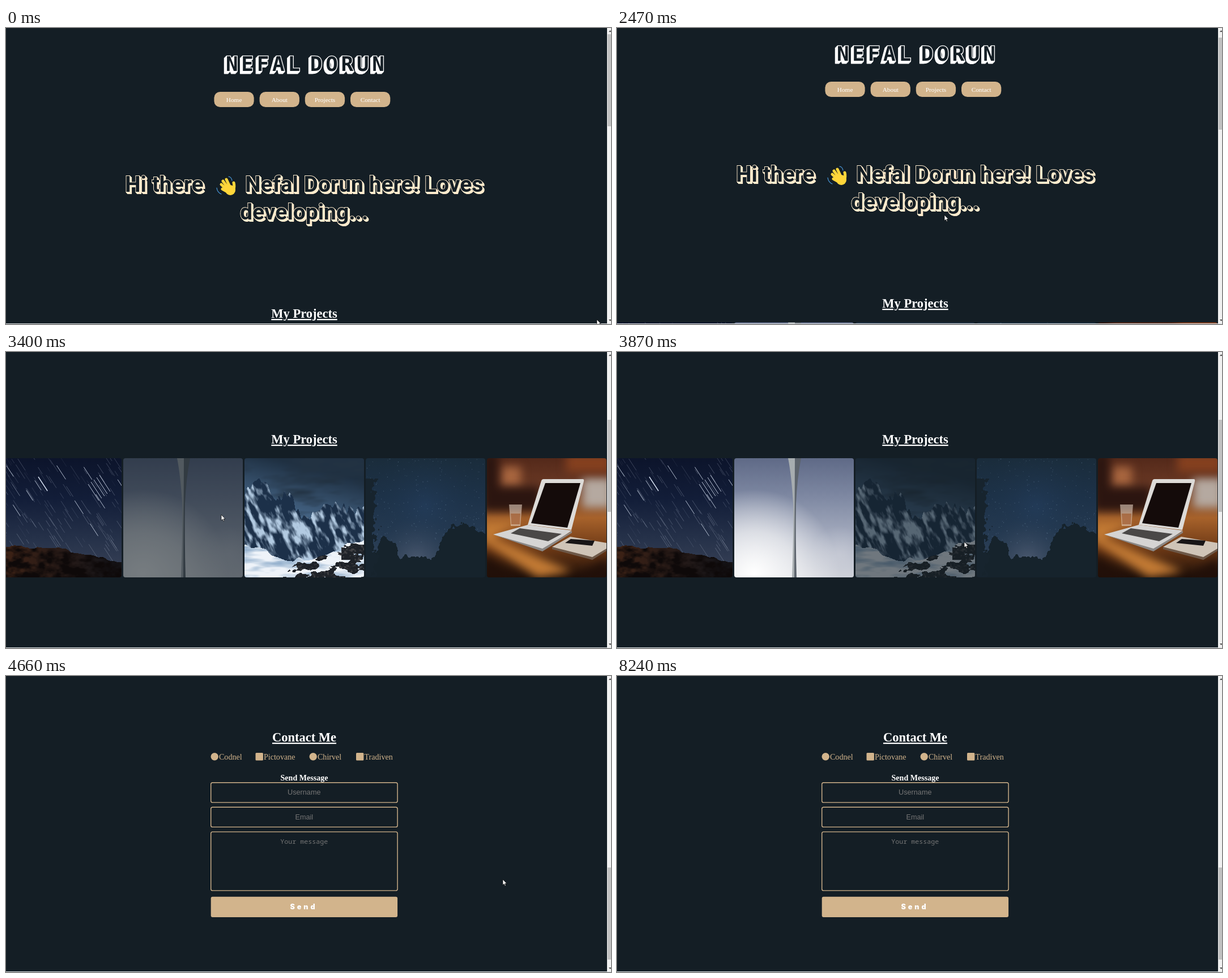
Recreate the animation shown at these times as an HTML page with a canvas. Size 1068 px wide and 524 px high, loop 8.58 s.

```html
<!DOCTYPE html>
<html lang="en">
<head>
<meta charset="utf-8">
<title>Portfolio</title>
<style>
  html, body { margin: 0; width: 100%; height: 100%; overflow: hidden; background: #141e25; }
  #stage { position: relative; width: 1068px; height: 524px; overflow: hidden; }
  #page, #page > *, #chrome { position: absolute; left: 0; top: 0; }
  #page { will-change: transform; }
  svg { display: block; }
  text { font-family: "Liberation Serif", "Times New Roman", serif; fill: #fff; }
  .mid { text-anchor: middle; }
  .head { font-size: 22.5px; font-weight: 700; text-decoration: underline; }
  .sub { font-size: 14.06px; font-weight: 700; }
  .nav rect, .send rect { fill: tan; }
  .nav text { font-size: 11.3px; }
  .nav.on rect { fill: orangered; }
  .link, .link text { fill: tan; font-size: 14.06px; }
  .link.on, .link.on text { fill: orangered; }
  .field rect { fill: none; stroke: tan; stroke-width: 1.4; }
  .field text { fill: #757575; font: 12.66px "Liberation Sans", Arial, sans-serif; }
  .field .mono { font: 11.66px "Noto Sans Mono", monospace; }
  .send text { font: 900 12.6px Inter, sans-serif; letter-spacing: 3.9px; }
  .send.on text { fill: orangered; }
  #name { font: 700 36px "DejaVu Sans Mono", monospace; letter-spacing: 5.7px; word-spacing: -15.4px; }
  #hero text { font: 700 39px Roboto, sans-serif; }
  #name, #hero text { fill: inherit; }
  canvas { border-radius: 4px; }
  canvas.on { opacity: .42; }
</style>
</head>
<body>
<div id="stage">
  <div id="page">
    <svg id="art" width="1061" height="1611">
      <defs>
        <text id="name" x="388" y="76">NEFAL DORUN</text>
        <g id="hero">
          <text x="210" y="290">Hi there</text>
          <text x="422" y="290">Nefal Dorun here! Loves</text>
          <text x="413" y="339">developing...</text>
        </g>
      </defs>
      <g id="shades"></g>
      <g fill="none" stroke-linecap="round">
        <circle cx="396" cy="287" r="9" fill="#ffd63a"/>
        <path stroke="#ffd63a" stroke-width="5" d="M397 285L389 268M394 286L383 271M392 288L380 277M391 290L382 285M401 289Q404 281 402 274"/>
        <path stroke="#4a9be0" stroke-width="1.2" d="M393 263q5 1 6 7M372 283q1 8 8 11"/>
      </g>
      <text class="head mid" x="526.5" y="513">My Projects</text>
      <g id="contact" transform="translate(0 1055)">
        <text class="head mid" x="526.5" y="116">Contact Me</text>
        <text class="sub mid" x="526.5" y="184.5">Send Message</text>
      </g>
    </svg>
  </div>
  <svg id="chrome" width="1068" height="524">
    <rect y="523" width="1068" height="1" fill="#dfe3e6"/>
    <rect x="1061" width="7" height="523" fill="#f1f1f1"/>
    <rect id="thumb" x="1062" width="6" height="163" fill="#c1c1c1"/>
    <path d="M1064 7l2.5-3 2.5 3zM1064 516l2.5 3 2.5-3z" fill="#505050"/>
    <path id="cursor" fill="#fff" stroke="#000" stroke-width=".7" stroke-linejoin="round"/>
  </svg>
</div>
<script>
const $ = id => document.getElementById(id);
const LOOP = 8580, GONE = 8200;          // loop length, time the pointer leaves
const GALLERY = 351, CONTACT = 1055;     // scroll stops
const hot = [];                          // hover areas in page coordinates

const clamp = v => Math.max(0, Math.min(1, v));
const smooth = v => (v = clamp(v), v * v * (3 - 2 * v));
const lerp = (a, b, t) => a + (b - a) * t;

// Eased value of a list of [position, ...values]
function along(keys, p) {
  const n = keys.findIndex(k => k[0] > p);
  const b = keys.at(n), a = n > 0 ? keys[n - 1] : b;
  const e = smooth((p - a[0]) / (b[0] - a[0] || 1));
  return a.slice(1).map((v, i) => lerp(v, b[i + 1], e));
}

function add(parent, html) {
  parent.insertAdjacentHTML('beforeend', html);
  return parent.lastElementChild;
}
const area = (el, x, y, w, h, kind) => hot.push({ el, x, y, w, h, kind });

// Lettering with a solid extruded side
function shade(id, color, dir, depth, line) {
  for (let i = depth; i >= 0; i -= .5)
    add($('shades'), `<use href="#${id}" x="${dir * i}" y="${i}" fill="${color}" stroke="${color}" stroke-width="${line}"/>`);
  add($('shades'), `<use href="#${id}" fill="#141e25"/>`);
}
shade('name', '#fff', -1, 4, 2.6);
shade('hero', '#ffebcd', 1, 3, 1.8);

['Home', 'About', 'Projects', 'Contact'].forEach((label, i) => {
  const x = 367.4 + i * 80.2;
  area(add($('art'), `<g class="nav"><rect x="${x}" y="113" width="70.3" height="27" rx="10.5"/>
    <text class="mid" x="${x + 35.2}" y="131">${label}</text></g>`), x, 113, 70, 27, 'hand');
});

const contact = $('contact');
[['Codnel', 361], ['Pictovane', 440], ['Chirvel', 535], ['Tradiven', 617.5]].forEach(([label, x], i) => {
  const el = add(contact, `<g class="link"><rect x="${x + .5}" y="136" width="13.4" height="13.4" rx="${i % 2 ? 1.5 : 7}"/>
    <text x="${x + 15}" y="147.5">${label}</text></g>`);
  area(el, x, CONTACT + 135, 72, 16, 'hand');
});

function box(kind, y, h, content, pointer) {
  const el = add(contact, `<g class="${kind}"><rect x="361.7" y="${y}" width="329.4" height="${h}" rx="3"/>${content}</g>`);
  area(el, 361, CONTACT + y, 330, h, pointer);
}
const hint = (y, label, cls = '') => `<text class="mid ${cls}" x="526.3" y="${y}">${label}</text>`;
box('field', 188.7, 35.2, hint(209.7, 'Username'), 'beam');
box('field', 232.2, 35.2, hint(253.7, 'Email'), 'beam');
box('field', 275.9, 104, hint(297, 'Your message', 'mono'), 'beam');
box('send', 390.7, 36.4, '<text x="501.5" y="413">Send</text>', 'hand');

// Gallery pictures
const S = 211;
let seed = 7;
const rnd = (a, b) => lerp(a, b, (seed = seed * 16807 % 2147483647) / 2147483647);

function hash(x, y) {
  const s = Math.sin(x * 127.1 + y * 311.7) * 43758.5453;
  return s - Math.floor(s);
}
function noise(x, y) {
  const i = Math.floor(x), j = Math.floor(y), u = smooth(x - i), v = smooth(y - j);
  return lerp(lerp(hash(i, j), hash(i + 1, j), u), lerp(hash(i, j + 1), hash(i + 1, j + 1), u), v);
}
const rough = (x, y) => (noise(x, y) * 4 + noise(x * 2, y * 2) * 2 + noise(x * 4, y * 4)) / 7;
const blend = (a, b, t) => a.map((v, i) => lerp(v, b[i], clamp(t)));

// Colours each pixel by a rule; no colour leaves it as it is
function paint(g, rule) {
  for (let y = 0; y < S; y++) for (let x = 0; x < S; x++) {
    const c = rule(x, y);
    if (c) { g.fillStyle = `rgb(${c.map(Math.round)})`; g.fillRect(x, y, 1, 1); }
  }
}
function wash(g, grad, ...stops) {
  stops.forEach((c, i) => grad.addColorStop(i / (stops.length - 1), c));
  g.fillStyle = grad;
  g.fillRect(0, 0, S, S);
}
const fall = (g, ...stops) => wash(g, g.createLinearGradient(0, 0, 0, S), ...stops);
const glow = (g, x, y, r, ...stops) => wash(g, g.createRadialGradient(x, y, 0, x, y, r), ...stops);
function fill(g, color, d) { g.fillStyle = color; g.fill(new Path2D(d)); }
function streak(g, alpha, width, x, y, n) {
  g.strokeStyle = `rgba(215,225,242,${alpha})`; g.lineWidth = width;
  g.beginPath(); g.moveTo(x, y); g.lineTo(x + n * .65, y + n); g.stroke();
}

function starTrails(g) {
  fall(g, '#0c142b', '#121d38', '#253149', '#3a4358');
  for (let i = 0; i < 130; i++) streak(g, rnd(.08, .4), .7, rnd(-10, S), rnd(-10, 160), rnd(6, 26));
  for (let i = 0; i < 10; i++) streak(g, .8, 1, rnd(0, S), rnd(0, 130), rnd(16, 26));
  for (let i = 0; i < 5; i++) streak(g, .85, 1, 152 + i * 5, 46 - i * 4, 29);
  streak(g, 1, 1.4, 64, 33, 25);
  paint(g, (x, y) => y > 148 + x * x / 1500 + 14 * rough(x / 22, 3) &&
    blend(blend([62, 34, 21], [22, 21, 25], x / 190), [14, 9, 9], rough(x / 14, y / 9) * 2.4 - .8 + (y - 170) / 90));
}

function needle(g) {
  fall(g, '#5f6a87', '#7f89a3', '#a6adbf', '#cdd0d8');
  glow(g, 35, 205, 150, '#fff', 'rgba(250,250,250,.65)', 'rgba(255,255,255,0)');
  glow(g, 185, 170, 50, 'rgba(225,226,232,.35)', 'rgba(225,226,232,0)');
  fill(g, '#a7adb0', 'M95 0H108L107 211H102Q105 130 104 80Q101 30 95 0z');
  fill(g, '#5d646d', 'M107 0H118Q111 35 109 80Q108 140 110 211H106z');
}

function mountain(g) {
  const ridge = [[0, 60], [22, 34], [35, 35], [56, 72], [74, 62], [105, 106], [140, 88], [160, 84], [195, 92], [211, 88]];
  const snow = [[0, 160], [100, 186], [150, 172], [211, 148]];
  paint(g, (x, y) => {
    const top = along(ridge, x)[0] + 16 * (noise(x / 5, 1) - .5);
    if (y < top)
      return blend(blend([30, 47, 65], [68, 99, 132], (y - x * .25) / 90 + .15), [34, 50, 66], rough(x / 60 + y / 90, y / 20) * 3 - 1.3);
    const edge = along(snow, x)[0];
    const rock = rough((x + y) / 22, y / 11 - x / 50) + (x > 170 && y < 180 ? .2 : 0) + (y - 190) / 200;
    if (y > edge - 12 * noise(x / 12, 5))
      return x + y > 275 && rock > .53 ? blend([30, 34, 40], [95, 92, 92], noise(x / 3, y / 2) * 1.5 - .8)
        : blend([238, 243, 249], [150, 178, 206], rough(x / 40, y / 9) * 2.4 - .9);
    const lit = rough((x - y * .45) / 9, (y + x * .5) / 24) * 3.6 - 1.55 + (y - 120) / 400;
    return blend([28, 48, 73], [178, 202, 225], lit);
  });
}

function forest(g) {
  fall(g, '#1a2c3b', '#1d3249', '#273c54', '#344359');
  glow(g, 105, 85, 120, 'rgba(36,62,94,.6)', 'rgba(26,44,60,0)');
  glow(g, 90, 180, 75, 'rgba(84,98,120,.75)', 'rgba(50,66,88,0)');
  for (let i = 0; i < 260; i++) {
    g.fillStyle = `rgba(165,195,225,${rnd(.05, .45)})`;
    g.fillRect(rnd(0, S), rnd(0, 150), 1, 1);
  }
  const tops = [[0, 170], [18, 165], [32, 137], [50, 150], [62, 178], [85, 170], [115, 176], [150, 120], [175, 118], [211, 128]];
  paint(g, (x, y) => y > along(tops, x)[0] + 22 * (rough(x / 7, y / 9) - .5) && [22, 35, 44]);
  paint(g, (x, y) => y > 35 && x < 30 * rough(x / 9, y / 12) && [23, 36, 46]);
}

function desk(g) {
  fall(g, '#54291a', '#6b3a25', '#a7622b', '#6f3a16', '#1d0f09');
  g.filter = 'blur(8px)';
  fill(g, '#b5a9a0', 'M168 35H220V88H168z');
  fill(g, '#a8663f', 'M25 15H60V55H25z');
  fill(g, '#2b1510', 'M-9 50H95V95H-9zM-9 -9H20V60H-9z');
  fill(g, '#85401f', 'M140 -9H220V25H140z');
  fill(g, '#c27a34', 'M-9 112H60L10 140 150 200 90 211-9 145z');
  fill(g, '#221009', 'M-9 165L70 220H-9zM211 178L140 220H220z');
  g.filter = 'none';
  fill(g, 'rgba(225,205,190,.6)', 'M39 82H62L59 120H42z');
  fill(g, 'rgba(160,90,45,.7)', 'M42 98H59L58 117H43z');
  fill(g, '#d5d4d3', 'M72 118L150 128 98 163 11 135z');
  fill(g, '#8a8785', 'M11 135L98 160 150 129V132L98 165z');
  fill(g, '#4a4847', 'M58 124L132 134 108 147 42 133z');
  fill(g, '#dddbd8', 'M96 40Q97 37 100 37H169Q172 37 171 41L149 127 72 118z');
  fill(g, '#140b0a', 'M103 44H165L142 123 78 115z');
  fill(g, '#cfc4b7', 'M115 157L147 139 211 150V163L186 179z');
  fill(g, '#6d5848', 'M115 157L186 175 211 160V164L186 180 115 161z');
  fill(g, '#181516', 'M138 150L148 143 190 146 186 155z');
}

[starTrails, needle, mountain, forest, desk].forEach((draw, i) => {
  const card = document.createElement('canvas'), x = Math.round(-6.9 + 213.9 * i);
  card.width = card.height = S;
  card.style.cssText = `left:${x}px;top:539px`;
  draw(card.getContext('2d'));
  $('page').prepend(card);
  area(card, x, 539, S, S, 'arrow');
});

// Pointer stops: [time, x, y]
const stops = [[0, 1043, 516], [880, 404, 143], [1070, 402, 127], [1740, 572, 130], [2400, 578, 331], [2467, 578, 331],
  [2600, 518, 303], [3070, 470, 291], [3400, 380, 288], [3600, 140, 292], [4067, 920, 365], [4200, 937, 380],
  [4500, 937, 380], [4980, 402, 198], [5300, 392, 141], [5800, 504, 140], [6380, 655, 141], [6710, 608, 186],
  [7570, 540, 412], [GONE, 1017, 516]];

const scrollAt = t => Math.round(GALLERY * smooth((t - 2442) / 181) + (CONTACT - GALLERY) * smooth((t - 4067) / 387));

const pointers = {
  arrow: 'M0 0V10.2L2.3 8.1 3.9 11.7 5.4 11 3.9 7.5H7z',
  hand: 'M-1 1Q0-.5 1 1V5L5.5 6Q6.5 6.5 6 9L5 12.5H-1L-4 8.5Q-4 6.8-2.5 7.5L-1 8.5z',
  beam: 'M-2-5H2V-4H.5V4H2V5H-2V4H-.5V-4H-2z'
};

function frame(now) {
  const t = Math.floor(now % LOOP * .015 + .01) / .015;   // 15 pictures a second
  const scroll = scrollAt(t), shown = t < GONE;
  const [x, y] = along(stops, t).map(Math.round);
  let kind = 'arrow';
  for (const h of hot) {
    const on = shown && x >= h.x && x < h.x + h.w && y + scroll >= h.y && y + scroll < h.y + h.h;
    h.el.classList.toggle('on', on);
    if (on) kind = h.kind;
  }
  $('page').style.transform = `translateY(${-scroll}px)`;
  $('thumb').setAttribute('y', Math.round(11 + scroll * .311));
  $('cursor').setAttribute('d', pointers[kind]);
  $('cursor').setAttribute('transform', `translate(${x} ${y})`);
  $('cursor').style.display = shown ? '' : 'none';
  requestAnimationFrame(frame);
}
requestAnimationFrame(frame);
</script>
</body>
</html>
```
